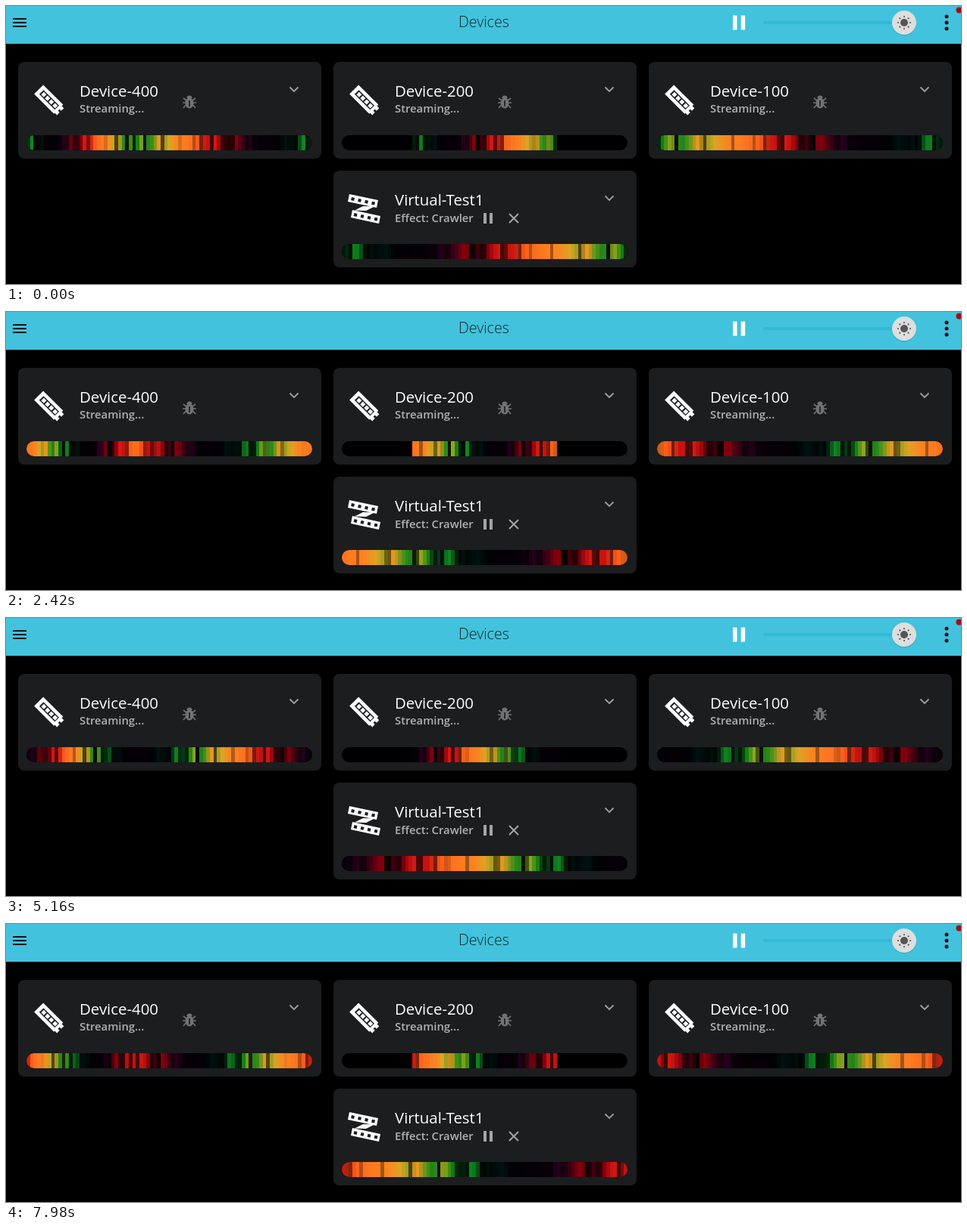
Animation of 1260 by 368 pixels, one loop 8 s. Source, as an HTML page:

```html
<!DOCTYPE html>
<html lang="en">
<head>
<meta charset="utf-8">
<title>Devices</title>
<style>
  html, body { margin: 0; width: 100%; height: 100%; overflow: hidden; background: #000; }
  svg { display: block; width: 1260px; height: 368px; font-family: "Open Sans", "Noto Sans", sans-serif; }
  .name { font-size: 20.4px; font-weight: 500; fill: #fff; }
  .info { font-size: 14.8px; font-weight: 600; fill: #b2b2b3; }
</style>
</head>
<body>
<svg id="stage" viewBox="0 0 1260 368">
  <defs>
    <clipPath id="pill"><rect width="377" height="20" rx="10"/></clipPath>
    <g id="strip" transform="translate(41.3 50.6) rotate(45)">
      <path d="M-20-8.5H17V-6H21V-1H18V2H21V7H17V8.5H-20Z" fill="#fff"/>
      <path d="M-15-4H14V4H-15Z" fill="#1c1d1f"/>
      <path d="M-13-2.5h5v5h-5zm7 0h5v5h-5zm7 0h5v5h-5zm7 0h5v5h-5z" fill="#fff"/>
    </g>
    <g id="zigzag">
      <path d="M21 31l38 8-2 10-38-8zM25 52l37 8-2 10-37-8zM28 52.5l11-5.5 15 .5-11 5.5z" fill="#fff"/>
      <path id="holes" d="M24 35l4 .9-.9 4-4-.9zm9 1.9l4 .9-.9 4-4-.9zm9 1.9l4 .9-.9 4-4-.9zm9 1.9l4 .9-.9 4-4-.9z" fill="#1c1d1f"/>
      <use href="#holes" x="3.5" y="21"/>
    </g>
    <g id="bug" transform="translate(226 53)" fill="none" stroke="#737374" stroke-width="1.7">
      <path d="M-8-5l3 2.5h10l3-2.5M-9 1H9M-8 8l3-3.5h10L8 8"/>
      <ellipse cy="1.5" rx="5.4" ry="7" fill="#737374" stroke="none"/>
      <path d="M-3.6-5a3.6 3.6 0 0 1 7.2 0z" fill="#737374" stroke="none"/>
      <path d="M0-2V6" stroke="#1c1d1f"/>
    </g>
    <g id="controls">
      <path d="M198 56h4v14h-4zm8 0h4v14h-4z" fill="#a5a5a6"/>
      <path d="M232 57l12 12m0-12l-12 12" stroke="#a5a5a6" stroke-width="2"/>
    </g>
  </defs>

  <rect width="1260" height="50" fill="#42c2dc"/>
  <path d="M9 16h18v2H9zm0 5h18v2H9zm0 5h18v2H9z" fill="#0b1517"/>
  <text x="597" y="28" font-size="19.6" font-weight="300" fill="#10292e">Devices</text>
  <path d="M959 12.5h5.5v19H959zm10.7 0h5.5v19h-5.5z" fill="#fff"/>
  <rect x="999" y="20" width="186" height="4" rx="2" fill="#2fbad8"/>
  <circle cx="1185" cy="23" r="16" fill="#258ba0" opacity=".5"/>
  <circle cx="1185" cy="22" r="16" fill="#dedede"/>
  <circle cx="1185" cy="22" r="5" fill="#555"/>
  <g id="rays" fill="#555"></g>
  <g fill="#0b1517">
    <circle cx="1241" cy="14" r="2.5"/><circle cx="1241" cy="22" r="2.5"/><circle cx="1241" cy="30" r="2.5"/>
  </g>
  <circle cx="1257.5" cy="5.5" r="4" fill="#a80a14"/>
</svg>
<script>
const CELLS = 81, LOOP = 8000, STEP = 76;
const stage = document.getElementById("stage");

function add(parent, tag, attrs) {
  const el = document.createElementNS("http://www.w3.org/2000/svg", tag);
  for (const key in attrs) el.setAttribute(key, attrs[key]);
  return parent.appendChild(el);
}

const rays = document.getElementById("rays");
for (let i = 0; i < 8; i++) {
  const a = i * Math.PI / 4;
  add(rays, "circle", { cx: 1185 + 8 * Math.cos(a), cy: 22 + 8 * Math.sin(a), r: 1.1 });
}

// Each map turns a place on the bar into a place on the shared strip, or null.
const cards = [
  { x: 16, y: 74, name: "Device-400", map: c => c < 0.375 ? c / 0.375 : (1 - c) / 0.625 },
  { x: 432, y: 74, name: "Device-200", map: c => c > 0.245 && c < 0.755 ? (c - 0.25) * 2 : null },
  { x: 848, y: 74, name: "Device-100", map: c => 1 - c },
  { x: 432, y: 218, name: "Virtual-Test1", effect: true, map: c => c }
];

for (const card of cards) {
  const g = add(stage, "g", { transform: `translate(${card.x} ${card.y})` });
  const icons = card.effect ? ["zigzag", "controls"] : ["strip", "bug"];
  add(g, "rect", { width: 400, height: 128, rx: 8, fill: "#1c1d1f" });
  for (const id of icons) add(g, "use", { href: "#" + id });
  add(g, "text", { x: 81, y: 46, class: "name" }).textContent = card.name;
  add(g, "text", { x: 81, y: card.effect ? 68 : 67, class: "info" }).textContent =
    card.effect ? "Effect: Crawler" : "Streaming...";
  add(g, "path", { d: "M358.5 33.5l5.5 5.5 5.5-5.5", fill: "none", stroke: "#a0a0a1", "stroke-width": 1.8 });
  const bar = add(g, "g", { transform: "translate(11 97)", "clip-path": "url(#pill)" });
  add(bar, "rect", { width: 377, height: 20 });
  card.cells = [];
  for (let i = 0; i < CELLS; i++) {
    const u = card.map((i + 0.5) / CELLS);
    if (u === null) continue;
    const left = Math.round(i * 377 / CELLS), right = Math.round((i + 1) * 377 / CELLS);
    card.cells.push({ u, el: add(bar, "rect", { x: left, width: right - left, height: 20 }) });
  }
}

// Colour ramp along the strip: place, then hex colour.
const ramp = [
  [0, "040004"], [0.05, "22001c"], [0.1, "3a0012"], [0.135, "8c000c"], [0.18, "3c0010"],
  [0.22, "8c000c"], [0.25, "d41a12"], [0.3, "c41010"], [0.335, "f04a18"], [0.36, "ff6a1c"],
  [0.42, "ff7c20"], [0.46, "fa8420"], [0.505, "dca424"], [0.53, "a09c1c"], [0.565, "e8981e"],
  [0.595, "54941a"], [0.62, "168018"], [0.657, "a0a81e"], [0.685, "148014"], [0.72, "064a20"],
  [0.757, "128a1c"], [0.785, "042a18"], [0.82, "000806"], [0.86, "001210"], [0.89, "000202"],
  [0.94, "060006"], [1, "040004"]
].map(([p, hex]) => [p, [0, 2, 4].map(k => parseInt(hex.slice(k, k + 2), 16))]);

// Chopped gaps: place, half width, depth.
const gaps = [
  [0.03, 0.01, 0.6], [0.075, 0.01, 0.6], [0.16, 0.012, 0.9], [0.2, 0.014, 0.6],
  [0.272, 0.011, 0.7], [0.326, 0.008, 0.5], [0.37, 0.007, 0.3], [0.44, 0.007, 0.35],
  [0.543, 0.008, 0.6], [0.64, 0.009, 0.92], [0.708, 0.012, 0.7], [0.733, 0.01, 0.85],
  [0.795, 0.012, 0.8]
];

function colour(p) {
  p -= Math.floor(p);
  const i = Math.max(1, ramp.findIndex(s => s[0] >= p));
  const [p0, a] = ramp[i - 1], [p1, b] = ramp[i];
  const k = (p - p0) / (p1 - p0);
  let light = 1;
  for (const [at, w, depth] of gaps) light *= 1 - depth * Math.exp(-(((p - at) / w) ** 4));
  return `rgb(${a.map((v, n) => Math.round((v + (b[n] - v) * k) * light))})`;
}

// The strip crawls left at an uneven pace: step, then turns travelled.
const path = [[0, 0.294], [22, -0.897], [32, -1.382], [48, -2.035], [68, -3], [85, -3.852], [105, -5.3]];

function offset(step) {
  const i = Math.max(1, path.findIndex(k => k[0] >= step));
  const [s0, a] = path[i - 1], [s1, b] = path[i];
  return a + (b - a) * (step - s0) / (s1 - s0);
}

let shown = -1;
function draw() {
  const step = Math.min(105, Math.floor((performance.now() % LOOP + 25) / STEP));
  if (step !== shown) {
    shown = step;
    const shift = offset(step);
    for (const { cells } of cards)
      for (const { u, el } of cells) el.setAttribute("fill", colour(u - shift));
  }
  requestAnimationFrame(draw);
}
draw();
</script>
</body>
</html>
```
